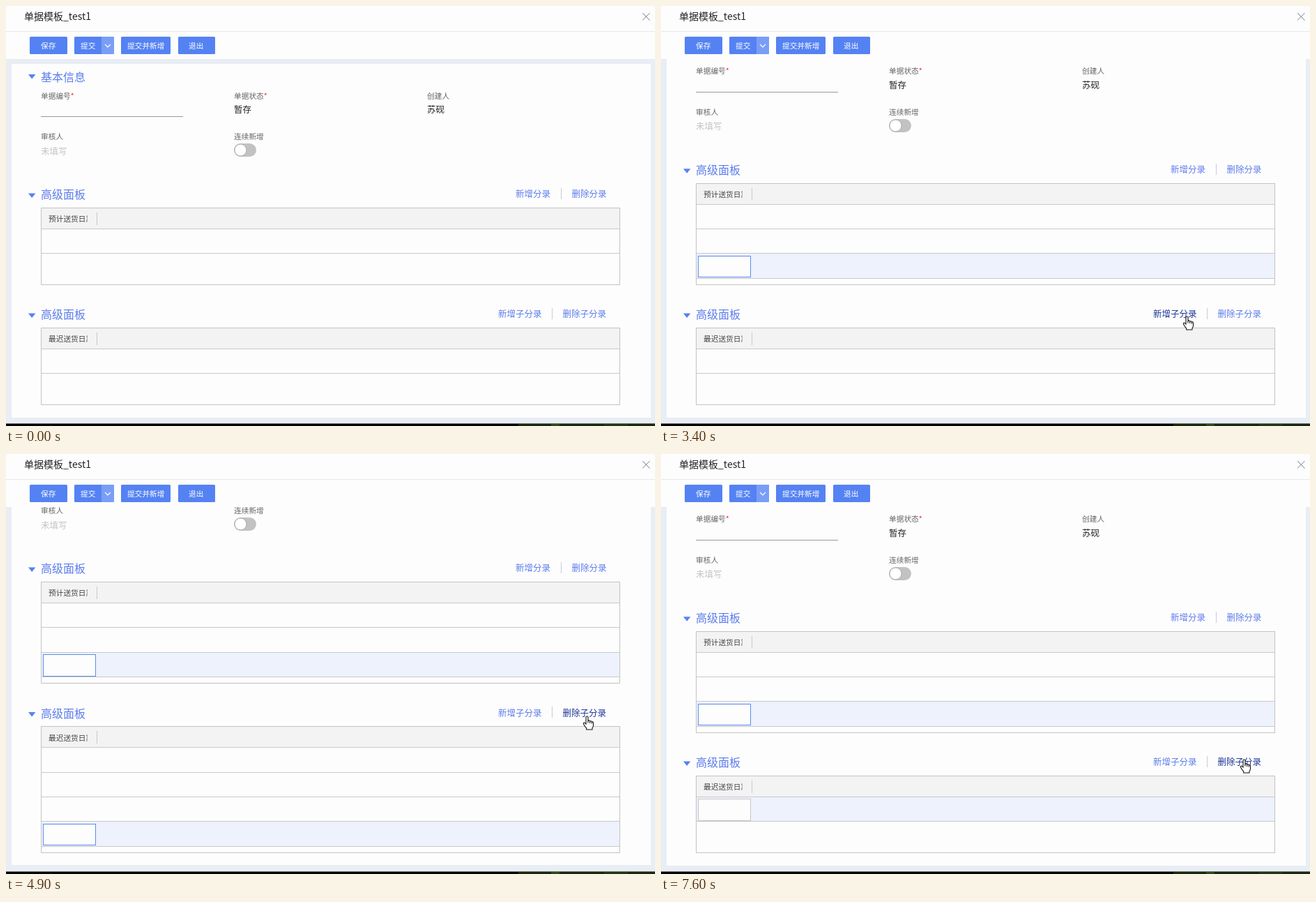
These frames come from a looping animation (931 by 602 pixels, 8 s). An HTML page with a canvas:

```html
<!DOCTYPE html>
<html lang="zh-CN">
<head>
<meta charset="utf-8">
<title>单据模板</title>
<style>
html, body { margin: 0; width: 100%; height: 100%; overflow: hidden; background: #fdfdfd; }
canvas { display: block; width: 931px; height: 602px; }
</style>
</head>
<body>
<canvas id="stage" width="931" height="602"></canvas>
<script>
const ctx = document.getElementById('stage').getContext('2d');
const LOOP = 8000, STEP = 100, ROW = 106 / 3;
const FONT = '"Noto Sans CJK SC", "Noto Sans CJK", "Noto Sans", sans-serif';
const BLUE = '#5582f3', LINK = '#5c7cec', PAPER = '#fdfdfd', LINE = '#c9c9c9';

// Times of the clicks on each link
const ADD = [1400, 2500], ADD_SUB = [3600, 3800, 4200], DEL_SUB = [5000, 6400, 7600];
const WHEEL = 4300;

// Pointer glides: start, end, x, y
const ENTRY = { x: 955, y: 75 };
const GLIDES = [
  [0, 700, 768, 280], [800, 1100, 769, 274], [1400, 1800, 721, 312], [1800, 2300, 769, 276],
  [2500, 2600, 753, 299], [2600, 3000, 737, 490], [3000, 3400, 754, 445],
  [4400, 4900, 833, 376], [5800, 5900, 833, 383], [5900, 6200, 834, 406],
  [6800, 7100, 834, 418], [7200, 7300, 836, 438]
];

const count = (times, t) => times.filter(c => c <= t).length;
const fresh = (times, t) => times.some(c => c <= t && t < c + STEP);

function stateAt(t) {
  const rows1 = 1 + count(ADD, t);
  const deleted = count(DEL_SUB, t);
  const rows2 = 1 + count(ADD_SUB, t) - deleted;
  const overflow = Math.max(0, rows1 - 2) + Math.max(0, rows2 - 2);
  return {
    shift: ROW * (t < WHEEL ? Math.min(1, overflow) : overflow),
    marked: t >= ADD_SUB[1] && t < 4700,
    main: { rows: rows1, picked: rows1 > 1, focused: true, faded: fresh(ADD, t) },
    sub: { rows: rows2, picked: t >= ADD_SUB[0], focused: !deleted, faded: fresh(ADD_SUB, t) }
  };
}

function pointerAt(t) {
  let { x, y } = ENTRY;
  for (const [from, to, toX, toY] of GLIDES) {
    const p = Math.min(1, Math.max(0, (t - from) / (to - from)));
    const ease = 1 - (1 - p) ** 3;
    x += (toX - x) * ease;
    y += (toY - y) * ease;
  }
  return { x: Math.round(x), y: Math.round(y), hand: false };
}

function box(x, y, w, h, color) {
  ctx.fillStyle = color;
  ctx.fillRect(x, y, w, h);
}

function round(x, y, w, h, r, color) {
  ctx.beginPath();
  ctx.roundRect(x, y, w, h, r);
  ctx.fillStyle = color;
  ctx.fill();
}

function frame(x, y, w, h, color) {
  ctx.strokeStyle = color;
  ctx.lineWidth = 1;
  ctx.strokeRect(x + .5, y + .5, w - 1, h - 1);
}

// Text is placed by its left edge and the middle of its line.
function text(str, x, mid, size, color) {
  ctx.font = `${size}px ${FONT}`;
  ctx.fillStyle = color;
  ctx.fillText(str, x, Math.round(mid + size * .38));
}

function stroke(points, color, width = 1) {
  ctx.beginPath();
  points.forEach(([x, y]) => ctx.lineTo(x, y));
  ctx.strokeStyle = color;
  ctx.lineWidth = width;
  ctx.stroke();
}

function button(label, x, w, textX) {
  round(x, 44, w, 25, 1.5, BLUE);
  text(label, textX, 57, 10.7, '#fff');
}

function header() {
  box(0, 0, 931, 76, PAPER);
  box(0, 36, 931, 1, '#e6e9ee');
  text('单据模板_test1', 26, 15, 14, '#222');
  stroke([[913, 10], [923.5, 20.5]], '#777a99');
  stroke([[923.5, 10], [913, 20.5]], '#777a99');
  button('保存', 34, 54, 50);
  button('提交', 98, 57, 107);
  box(137, 44, 18, 25, '#7a9ef7');
  stroke([[142, 55], [146, 59], [150, 55]], '#fff', 1.2);
  button('提交并新增', 165, 71, 174);
  button('退出', 247, 53, 262);
}

function section(title, y, triY) {
  ctx.beginPath();
  ctx.moveTo(32, triY - 3);
  ctx.lineTo(42.4, triY - 3);
  ctx.lineTo(37.2, triY + 3.5);
  ctx.fillStyle = BLUE;
  ctx.fill();
  text(title, 50, y, 16, LINK);
}

function label(str, x, y, required) {
  text(str, x, y, 10.7, '#666');
  if (required) text('*', x + 42.8, y, 10.7, '#e33');
}

function link(str, x, y, pointer, marked) {
  const w = str.length * 12.5;
  const over = pointer.x >= x && pointer.x <= x + w && Math.abs(pointer.y - y) <= 8;
  if (over) pointer.hand = true;
  if (marked) box(x, Math.round(y) - 9, w, 18, '#2b8cf5');
  text(str, x, y, 12.5, marked ? '#fff' : over ? '#1c3697' : LINK);
}

function tableBottom(top, rows) {
  return top + Math.max(110, 39 + ROW * rows);
}

function table(title, top, { rows, picked, focused, faded }) {
  const rowY = k => top + 30 + ROW * k;
  const lineY = k => Math.floor(rowY(k));
  const y0 = Math.floor(top), y1 = Math.floor(tableBottom(top, rows));
  box(50, y0, 831, y1 - y0, PAPER);
  box(50, y0, 831, 30, '#f3f3f3');
  if (picked) {
    const y = lineY(rows - 1);
    const inputTop = Math.round(rowY(rows - 1) + 2.7);
    const inputBottom = Math.round(rowY(rows - 1) + 34.3);
    box(51, y, 829, lineY(rows) - y, faded ? '#f6f8fe' : '#edf2fd');
    box(53, inputTop, 76, inputBottom - inputTop, PAPER);
    frame(53, inputTop, 76, inputBottom - inputTop, focused ? '#5f8aec' : '#c6c6c6');
  }
  for (let k = 0; k <= rows; k++) box(51, lineY(k), 829, 1, LINE);
  frame(50, y0, 831, y1 - y0 + 1, '#c3c3c3');
  box(130, y0 + 7, 1, 18, LINE);
  ctx.save();
  ctx.beginPath();
  ctx.rect(51, y0, 65.5, 30);
  ctx.clip();
  text(title, 61, top + 15.6, 10.7, '#444');
  ctx.restore();
}

function toggle(x, y) {
  round(x, y, 32, 19, 9.5, '#c2c2c2');
  ctx.beginPath();
  ctx.arc(x + 9.5, y + 9.5, 8.5, 0, 2 * Math.PI);
  ctx.fillStyle = '#fff';
  ctx.fill();
  ctx.strokeStyle = '#aaa';
  ctx.lineWidth = 1;
  ctx.stroke();
}

function basicInfo(dy) {
  section('基本信息', 102 + dy, 101 + dy);
  label('单据编号', 50, 128.5 + dy, true);
  box(50, Math.round(158.4 + dy), 204, 1, '#999');
  label('单据状态', 327, 128.5 + dy, true);
  text('暂存', 327, 148.5 + dy, 12.5, '#222');
  label('创建人', 604, 128.5 + dy);
  text('苏砚', 604, 148.5 + dy, 12.5, '#222');
  label('审核人', 50, 187 + dy);
  text('未填写', 50, 208 + dy, 12.5, '#c4c4c4');
  label('连续新增', 327, 187 + dy);
  toggle(327, Math.round(197 + dy));
}

function panel(top, noun, linkX, gapX, pointer, marked) {
  section('高级面板', top - 19.3, top - 18);
  link('新增' + noun, linkX, top - 20, pointer, marked);
  box(gapX, Math.round(top - 28.6), 1, 16, '#c8ccd4');
  link('删除' + noun, gapX + 15.5, top - 20, pointer);
}

const HAND = new Path2D('M-1.5 .5Q0 -2 1.5 .5V6Q3.5 4.6 4.2 6.6Q6 5.6 6.8 7.4Q9 6.8 9 9.2V13Q8.6 15 7.5 16.3V18.5H-.8V16.6Q-3 14.4-5 10.6Q-5.4 8.4-3.6 8.7L-1.5 10.6ZM1.5 6V9M4.2 6.6V9.5M6.8 7.4V10');
const ARROW = new Path2D('M0 0V14L3.3 11L5.6 16.2L7.8 15.2L5.5 10.2H9.8Z');

function cursor({ x, y, hand }) {
  const shape = hand ? HAND : ARROW;
  ctx.save();
  ctx.translate(x + .5, y + .5);
  ctx.fillStyle = '#fff';
  ctx.fill(shape);
  ctx.strokeStyle = '#111';
  ctx.lineWidth = 1.1;
  ctx.stroke(shape);
  ctx.restore();
}

function bottomStrip() {
  box(0, 598.5, 931, 3.5, '#050505');
  box(735, 599, 196, 3, '#18290c');
  box(782, 599, 12, 3, '#2f4a16');
  box(858, 599, 34, 3, '#22380f');
}

function draw(t) {
  const { shift, marked, main, sub } = stateAt(t);
  const pointer = pointerAt(t);
  const mainTop = 289.6 - shift;
  const subTop = mainTop + 172 + Math.max(0, main.rows - 2) * ROW;
  const paperTop = Math.max(76, 83 - shift);
  const paperBottom = Math.floor(tableBottom(subTop, sub.rows) + 18.5);

  box(0, 0, 931, 602, '#e9edf4');
  ctx.save();
  ctx.beginPath();
  ctx.rect(0, 76, 931, 523);
  ctx.clip();
  box(8, paperTop, 917, paperBottom - paperTop, PAPER);
  basicInfo(-shift);
  panel(mainTop, '分录', 731, 796, pointer, false);
  table('预计送货日期', mainTop, main);
  panel(subTop, '子分录', 706, 783, pointer, marked);
  table('最迟送货日期', subTop, sub);
  ctx.restore();

  header();
  bottomStrip();
  cursor(pointer);
}

const start = performance.now();
function tick() {
  const t = (performance.now() - start) % LOOP;
  draw(Math.floor(t / STEP) * STEP);
  requestAnimationFrame(tick);
}
tick();
</script>
</body>
</html>
```
